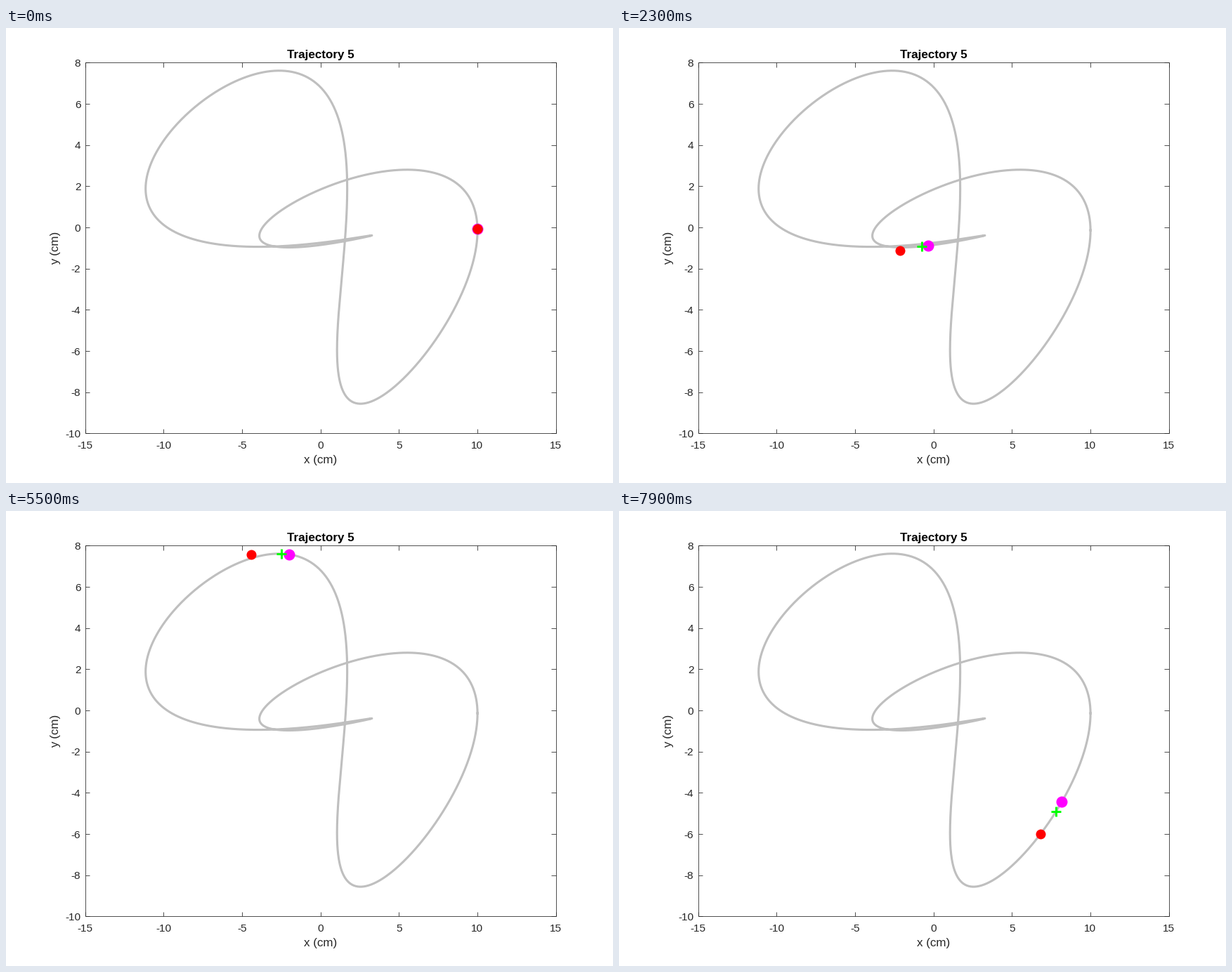
Animation of 864 by 648 pixels, one loop 8 s. Source, as a matplotlib script:

```python
import numpy as np
import matplotlib.pyplot as plt
from matplotlib.animation import FuncAnimation

plt.rcParams["font.family"] = "Liberation Sans"

W, H, DPI = 864, 648, 100
PT = 72 / DPI                      # points per pixel
LEFT, RIGHT, TOP, BOTTOM = 112.7, 782.5, 49.4, 577.4
SX, SY = (RIGHT - LEFT) / 30, (BOTTOM - TOP) / 18
INK = "#262626"

STEP, PHASE = 4.38, 0.25           # degrees per frame, start angle
GUIDE_LAG, CURSOR_LAG = 2.0, 8.0   # degrees behind the leading dot

# cursor wobble around the delayed path: frame, dx, dy in pixels
WOBBLE = np.array([
    (0, 0, 0), (9, -1, 1), (14, -2, 1), (18, -5, 0), (22, -4, 5),
    (25, -4, 6), (29, -3, 2), (33, 8, -8), (36, 13, -17.5), (39, 10, -16),
    (43, -4, -14), (45, -9, -15), (47, -1, 0.5), (51, -3, -1), (54, -7, -3),
    (58, -9, 4), (61, -9.5, 12), (63, 5, 13), (66, 0, 4), (69, -8, 0),
    (72, 5, 4), (74, 6, 10), (78, 5.5, -7),
])
SLOPES = np.gradient(WOBBLE[:, 1:], WOBBLE[:, 0], axis=0)


def to_px(x, y):
    return LEFT + (x + 15) * SX, TOP + (8 - y) * SY


def path(deg):
    """Sum of three sinusoids, each along its own direction."""
    t = np.radians(deg)
    a, b, c = np.cos(t), np.sin(2 * t), np.cos(3 * t - np.radians(22.8))
    return to_px(6.01 * a - 2.56 * b + 4.34 * c,
                 -2.43 * a + 4.52 * b + 2.49 * c)


def wobble(n):
    """Cubic Hermite interpolation of the cursor offsets."""
    t = WOBBLE[:, 0]
    i = int(np.clip(np.searchsorted(t, n, "right") - 1, 0, len(t) - 2))
    h = t[i + 1] - t[i]
    u = (n - t[i]) / h
    p, q = WOBBLE[i, 1:], WOBBLE[i + 1, 1:]
    return ((2 * u**3 - 3 * u**2 + 1) * p + (3 * u**2 - 2 * u**3) * q
            + h * (u**3 - 2 * u**2 + u) * SLOPES[i]
            + h * (u**3 - u**2) * SLOPES[i + 1])


fig = plt.figure(figsize=(W / DPI, H / DPI), dpi=DPI, facecolor="white")
ax = fig.add_axes([0, 0, 1, 1])
ax.set_xlim(0, W)
ax.set_ylim(H, 0)
ax.axis("off")


def rule(xs, ys):
    ax.plot(xs, ys, color=INK, lw=0.8 * PT, solid_capstyle="butt", zorder=1)


def label(x, y, text, size, ha="center", **kw):
    ax.text(x, y, text, fontsize=size * PT, ha=ha, va="baseline", **kw)


def marker(shape, color, size, edge, z):
    return ax.plot([], [], shape, color=color, ms=size * PT,
                   mew=edge * PT, zorder=z)[0]


# box, ticks on all sides and tick labels
TICK = 6.7
for y in (TOP, BOTTOM):
    rule([LEFT, RIGHT], [y, y])
for x in (LEFT, RIGHT):
    rule([x, x], [TOP, BOTTOM])
for v in range(-15, 16, 5):
    x = to_px(v, 0)[0]
    rule([x, x], [BOTTOM, BOTTOM - TICK])
    rule([x, x], [TOP, TOP + TICK])
    label(x, 599, str(v), 15.43, color=INK)
for v in range(-10, 9, 2):
    y = to_px(0, v)[1]
    rule([LEFT, LEFT + TICK], [y, y])
    rule([RIGHT, RIGHT - TICK], [y, y])
    label(106.3, y + 5.5, str(v), 15.43, ha="right", color=INK)

MID = (LEFT + RIGHT) / 2
label(MID, 42.5, "Trajectory 5", 17, weight="bold", color="black")
label(MID, 620, "x (cm)", 17, color=INK)
label(75, (TOP + BOTTOM) / 2, "y (cm)", 17, color=INK,
      rotation=90, rotation_mode="anchor")

ax.plot(*path(np.linspace(0, 360, 1200)), color="#bfbfbf", lw=3.1 * PT,
        solid_joinstyle="round", zorder=2)

leader = marker("o", "#ff00ff", 16, 0, 3)
guide = marker("+", "#00ff00", 14, 3, 4)
cursor = marker("o", "#ff0000", 14, 0, 5)


def place(artist, x, y):
    artist.set_data([x], [y])


def update(i):
    n = max(0, i - 1)              # the start pose is held for two frames
    deg = PHASE + STEP * n
    place(leader, *path(deg))
    place(guide, *path(deg - min(GUIDE_LAG, STEP * n)))
    x, y = path(deg - CURSOR_LAG * np.tanh(STEP * n / CURSOR_LAG))
    dx, dy = wobble(n)
    place(cursor, x + dx, y + dy)
    return leader, guide, cursor


anim = FuncAnimation(fig, update, frames=80, interval=100,
                     repeat=True, repeat_delay=0, blit=False)
plt.show()
```
